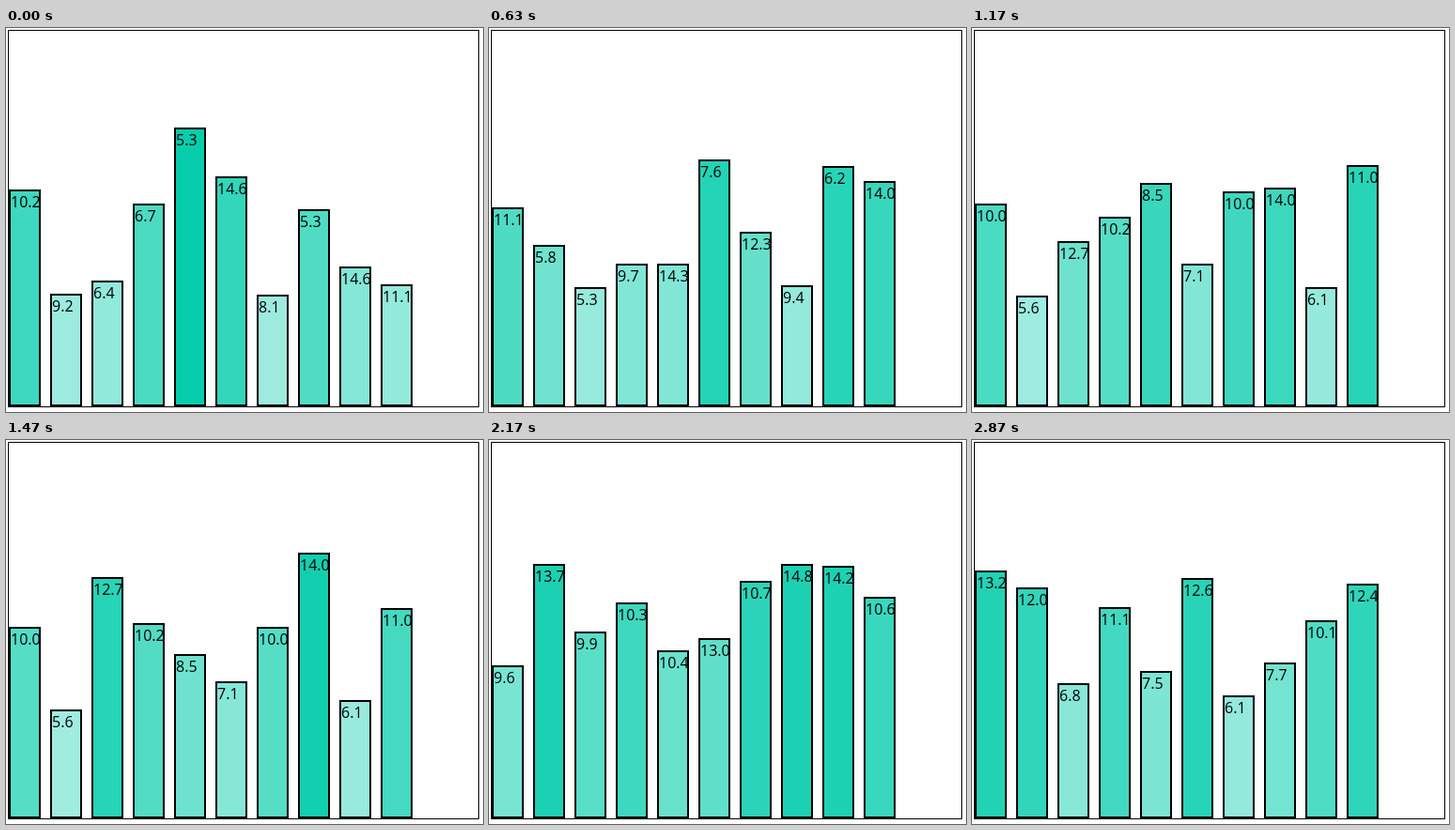
An HTML page for the animation above (2.94 s loop, 508 px wide and 409 px high).

```html
<!DOCTYPE html>
<html lang="en">
<head>
<meta charset="utf-8">
<title>Bar chart</title>
<style>
  html, body { margin: 0; width: 100%; height: 100%; overflow: hidden; background: #fff; }
  svg { display: block; width: 508px; height: 409px; }
  text { font: 16px "Open Sans", "Noto Sans", sans-serif; }
</style>
</head>
<body>
<svg id="chart" viewBox="0 0 508 409">
  <rect x="2.5" y="2.5" width="501" height="401" fill="none" stroke="#000"/>
</svg>
<script>
const LOOP = 2940, REFRESHES = 38, LEAD = 8;
const FIRST_CHANGE = 38, CHANGE_MS = 495;
const FLOOR = 403, PITCH = 44, UNIT = 20, BORDER = 2, MAX_VALUE = 15;

// Chart data: the resting row, then the labelled rows it eases through.
const rows = [
  [11.35, 5.8, 6.5, 10.6, 14.65, 12.05, 5.75, 10.3, 7.25, 6.3],
  [10.2, 9.2, 6.4, 6.7, 5.3, 14.6, 8.1, 5.3, 14.6, 11.1],
  [11.1, 5.8, 5.3, 9.7, 14.3, 7.6, 12.3, 9.4, 6.2, 14.0],
  [10.0, 5.6, 12.7, 10.2, 8.5, 7.1, 10.0, 14.0, 6.1, 11.0],
  [6.2, 13.0, 9.6, 12.4, 7.0, 5.6, 14.3, 11.8, 12.3, 12.7],
  [9.6, 13.7, 9.9, 10.3, 10.4, 13.0, 10.7, 14.8, 14.2, 10.6],
  [13.2, 12.0, 6.8, 11.1, 7.5, 12.6, 6.1, 7.7, 10.1, 12.4]
];

const chart = document.getElementById("chart");

function set(node, attrs) {
  for (const key in attrs) node.setAttribute(key, attrs[key]);
}

function add(name, attrs) {
  const node = document.createElementNS("http://www.w3.org/2000/svg", name);
  set(node, attrs);
  return chart.appendChild(node);
}

const bars = rows[0].map((_, i) => {
  const left = 3 + i * PITCH;
  return {
    box: add("rect", { x: left + 1, width: 32, stroke: "#000", "stroke-width": BORDER }),
    label: add("text", { x: left + BORDER })
  };
});

// cubic-bezier(.25, .1, .25, 1), solved by bisection
function ease(x) {
  let low = 0, high = 1, u = 0.5;
  for (let n = 0; n < 24; n++) {
    u = (low + high) / 2;
    if (0.75 * u * (1 - u) + u ** 3 < x) low = u; else high = u;
  }
  return 0.3 * u * (1 - u) ** 2 + 3 * (1 - u) * u * u + u ** 3;
}

// The picture refreshes at a steady rate and holds in between.
function refreshTime(ms) {
  const interval = LOOP / REFRESHES;
  return Math.min(REFRESHES - 1, Math.floor((ms + LEAD) / interval)) * interval;
}

function draw(ms) {
  const phase = Math.max(0, (refreshTime(ms) - FIRST_CHANGE) / CHANGE_MS);
  const step = Math.floor(phase);
  const progress = ease(phase - step);

  bars.forEach(({ box, label }, i) => {
    const from = rows[step][i], to = rows[step + 1][i];
    const value = from + (to - from) * progress;
    const top = FLOOR - Math.round(value * UNIT + 2 * BORDER);
    set(box, {
      y: top + 1,
      height: FLOOR - top - 2,
      fill: `rgba(0, 204, 170, ${value / MAX_VALUE})`
    });
    set(label, { y: top + 19 });
    label.textContent = to.toFixed(1);
  });
}

const begin = performance.now();
function frame() {
  draw((performance.now() - begin) % LOOP);
  requestAnimationFrame(frame);
}
frame();
</script>
</body>
</html>
```
